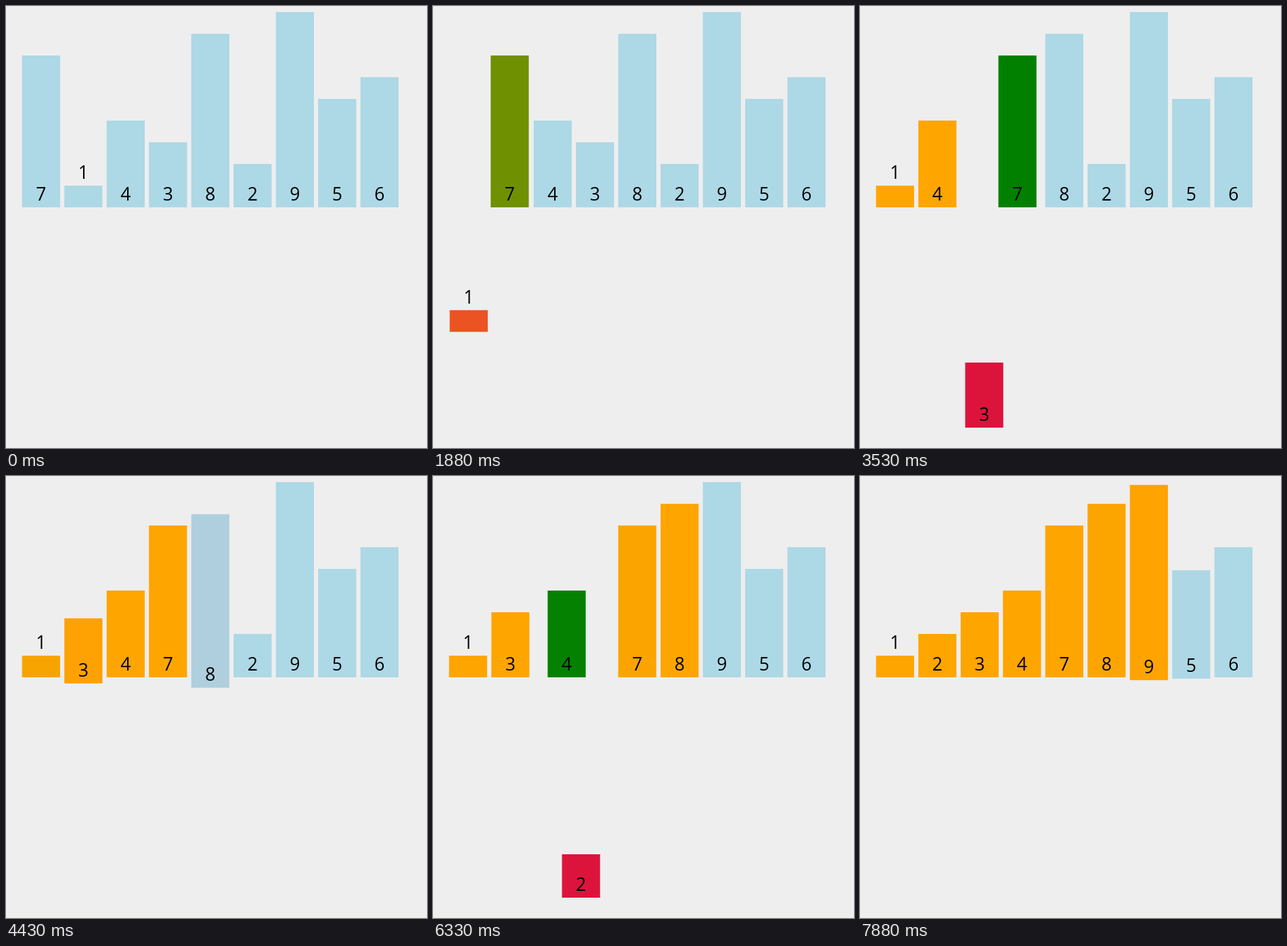
An HTML page with a canvas that plays this animation: 622 by 652 pixels, repeating every 8000 ms.

```html
<!DOCTYPE html>
<html lang="en">
<head>
<meta charset="utf-8">
<title>Insertion sort</title>
<style>
  html, body { margin: 0; width: 100%; height: 100%; overflow: hidden; background: #eee; }
  canvas { display: block; }
</style>
</head>
<body>
<canvas id="stage" width="622" height="652"></canvas>
<script>
const ctx = document.getElementById('stage').getContext('2d');

const LOOP = 8000, FIRST = 980, STEP = 111.29, TWEEN = 250;
const LEFT = 23.7, PITCH = 62.5, WIDTH = 56.25, UNIT = 32, BASE = 297, DROP = 325;
const BLUE = [173, 216, 230], GREEN = [0, 128, 0], RED = [220, 20, 60], ORANGE = [255, 165, 0];
const values = [7, 1, 4, 3, 8, 2, 9, 5, 6];

// [state number, start in ms]; states between are evenly spaced
const beats = [[1, 940], [5, 1751], [18, 4373], [23, 5398], [27, 6213], [34, 7638], [35, 7851], [36, 8054]];

function startOf(k) {
  const i = Math.max(1, beats.findIndex(b => b[0] >= k));
  const [k0, t0] = beats[i - 1], [k1, t1] = beats[i];
  return t0 + (t1 - t0) * (k - k0) / (k1 - k0);
}

// Each state holds [slot, drop, r, g, b] for every bar.
function buildStates() {
  const bars = values.map((v, i) => ({ slot: i, drop: 0, color: BLUE }));
  const order = [...bars];
  const states = [];
  const save = () => states.push(bars.map(b => [b.slot, b.drop, ...b.color]));

  save();
  bars[0].color = ORANGE;
  save();
  for (let i = 1; i < bars.length; i++) {
    const key = bars[i];
    key.drop = 1;
    key.color = RED;
    save();
    for (let j = i - 1; j >= 0; j--) {
      const other = order[j];
      other.color = GREEN;
      save();
      if (values[bars.indexOf(other)] < values[i]) {
        other.color = ORANGE;
        break;
      }
      other.slot = j + 1;
      key.slot = j;
      order[j + 1] = other;
      order[j] = key;
      save();
      other.color = ORANGE;
    }
    key.drop = 0;
    key.color = ORANGE;
    save();
  }
  return states;
}

const states = buildStates();

function ease(t) {
  t = Math.min(t, 1);
  return t < 0.5 ? 4 * t ** 3 : 1 - 4 * (1 - t) ** 3;
}

// Every new state interrupts the running tween and continues from where it is.
function poseAt(now) {
  let pose = states[0];
  for (let k = 1; startOf(k) <= now; k++) {
    const begin = startOf(k);
    const e = ease((Math.min(now, startOf(k + 1)) - begin) / TWEEN);
    pose = pose.map((bar, i) => bar.map((v, c) => v + (states[k][i][c] - v) * e));
  }
  return pose;
}

function draw(now) {
  ctx.fillStyle = '#eee';
  ctx.fillRect(0, 0, 622, 652);
  ctx.font = '26.5px "Open Sans", "Noto Sans", sans-serif';
  ctx.textAlign = 'center';
  poseAt(now).forEach(([slot, drop, ...rgb], i) => {
    const x = LEFT + slot * PITCH, bottom = BASE + drop * DROP, height = values[i] * UNIT;
    ctx.fillStyle = `rgb(${rgb.map(Math.round)})`;
    ctx.fillRect(x, bottom - height, WIDTH, height);
    ctx.fillStyle = '#000';
    ctx.fillText(values[i], x + WIDTH / 2, bottom - 10 - (values[i] === 1 ? UNIT : 0));
  });
}

function tick() {
  const t = performance.now() % LOOP;
  const n = Math.floor((t - FIRST + 10) / STEP);
  draw(n < 0 ? 0 : FIRST + n * STEP);
  requestAnimationFrame(tick);
}
tick();
</script>
</body>
</html>
```
